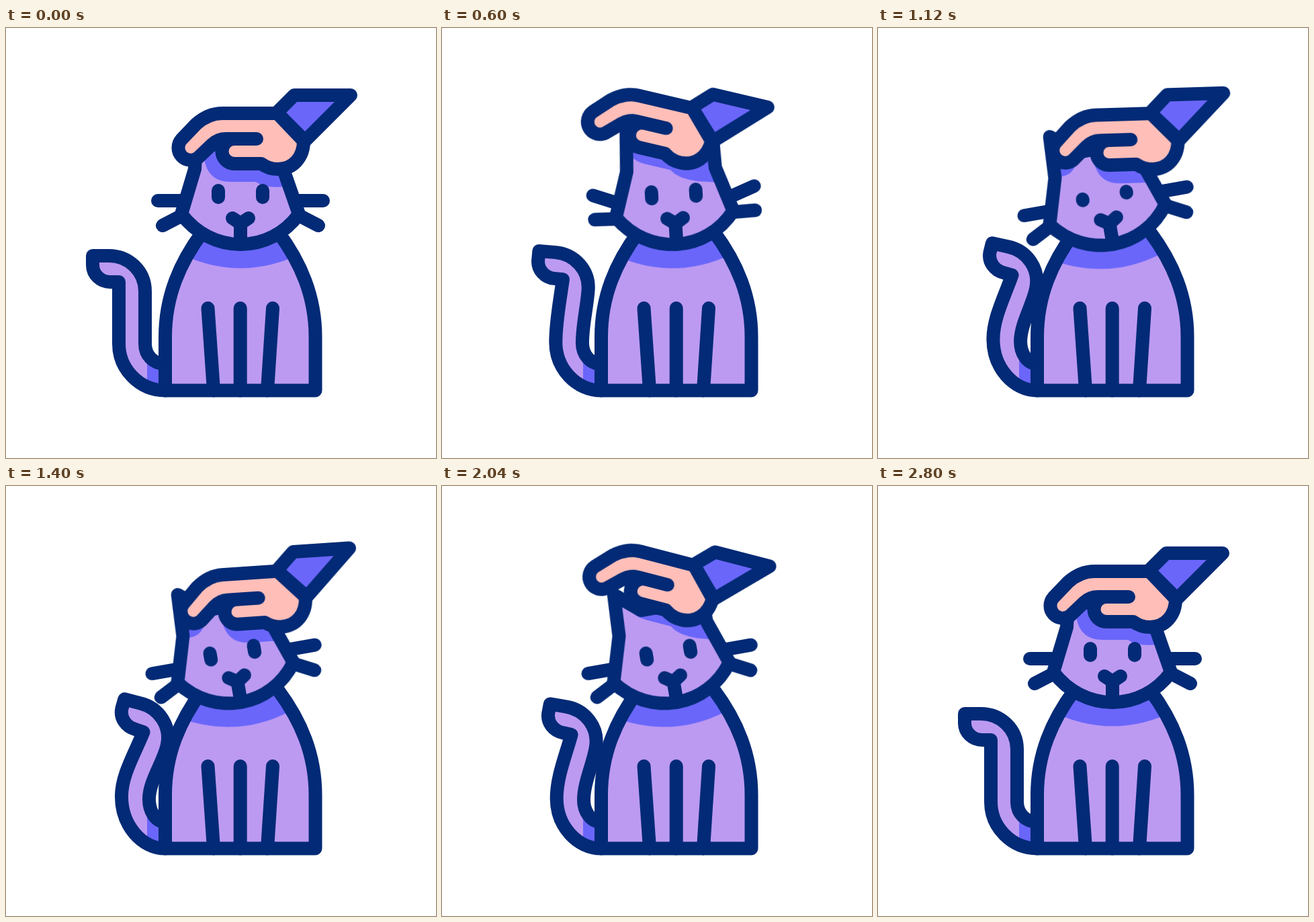
An HTML page without scripts that plays this animation: 640 by 640 pixels, repeating every 3 s.

```html
<!DOCTYPE html>
<html lang="en">
<head>
<meta charset="utf-8">
<title>Petting a cat</title>
<style>
  html, body { margin: 0; width: 100%; height: 100%; overflow: hidden; background: #fff; }
  svg { display: block; width: 100vw; height: 100vh; }

  .lilac { fill: #bc9af2; }
  .shade { fill: #6a66fa; }
  .skin { fill: #ffbeb8; }
  .line { stroke: #032a76; stroke-width: 20; stroke-linecap: round; stroke-linejoin: round; }
  .open { fill: none; }

  .tilt, .tail, .hand, .drift, .eyes, .whisker { animation: 3s infinite ease-in-out; }

  .tilt { --tilt: -10deg; transform-origin: 349px 317px; animation-name: tilt; }
  .neck { --tilt: -7deg; }
  @keyframes tilt {
    0%, 12% { transform: rotate(0deg); }
    32%, 67% { transform: rotate(var(--tilt)); }
    88%, 100% { transform: rotate(0deg); }
  }

  .whisker { animation-name: twitch; }
  @keyframes twitch {
    0%, 12% { transform: rotate(0deg); }
    20.5% { transform: rotate(var(--lift)); }
    32%, 67.5% { transform: rotate(0deg); }
    86% { transform: rotate(var(--lift)); }
    93.3%, 100% { transform: rotate(0deg); }
  }

  .eyes { animation-name: blink; }
  @keyframes blink {
    0%, 34%, 42%, 73%, 82%, 100% { d: path("M316 242V252M382 242V252"); }
    37%, 39%, 76.5%, 78% { d: path("M316 248V250M382 248V250"); }
  }

  .tail { animation-name: sway; }
  @keyframes sway {
    0%, 93.3%, 100% { d: path("M237 539.5C199 539.5 168 508 168 470C168 440 168 409 168 378L155 378C141 378 129 367 129 353L129 339L153 339C183 339 207 362 207 392C207 418 207 444 207 470C207 487 219 500 237 500"); }
    51% { d: path("M237 539.5C202 539.5 172 505 172 462C172 430 192 398 205 366L193 362C179 358 170 345 173 331L177 317L200 323C229 330 247 358 240 387C234 412 213 440 213 466C213 483 222 500 237 500"); }
  }

  .hand { transform-origin: 393px 139.5px; animation-name: stroke; }
  @keyframes stroke {
    0% { transform: translate(0, 0) rotate(0deg); }
    20% { transform: translate(-34px, -10.5px) rotate(13.2deg); animation-timing-function: cubic-bezier(.42, 0, .75, .85); }
    37.33% { transform: translate(2.5px, .5px) rotate(-1.7deg); animation-timing-function: ease-out; }
    42.67% { transform: translate(4.5px, .5px) rotate(-5deg); animation-timing-function: ease-in; }
    56% { transform: translate(-22.5px, -.5px) rotate(4deg); animation-timing-function: ease-out; }
    68% { transform: translate(-31.5px, -12px) rotate(14.6deg); animation-timing-function: linear; }
    77.33% { transform: translate(-14.5px, -5px) rotate(5.2deg); animation-timing-function: ease-out; }
    93.33%, 100% { transform: translate(0, 0) rotate(0deg); }
  }

  /* the hand's shadow slides less than the hand */
  .drift { animation-name: drift; }
  @keyframes drift {
    0%, 93.3%, 100% { transform: translateX(0); }
    20%, 68% { transform: translateX(22px); }
  }
</style>
</head>
<body>
<svg viewBox="0 0 640 640">
  <defs>
    <path id="body" d="M293 303C258 350 237 400 237 460V539.5H460.5V460C460.5 400 439.5 350 404.5 303"/>
    <path id="head" d="M284 148L281 210L261 277C283 306 315 322 349 322C383 322 415 306 436 277L413 211L411 148L378 178H320Z"/>
    <clipPath id="bodyClip"><use href="#body"/></clipPath>
    <clipPath id="headClip"><use href="#head" class="tilt"/></clipPath>
  </defs>

  <path class="tail lilac" d=""/>
  <path class="shade" d="M210 492H237V534H210Z"/>
  <path class="tail line open" d=""/>

  <use href="#body" class="lilac"/>
  <g clip-path="url(#bodyClip)">
    <path class="tilt neck shade" d="M255 290V334Q349 381 443 334V290Z"/>
  </g>
  <use href="#body" class="line open"/>
  <path class="line open" d="M300.5 417L309 539.5M348.7 417V539.5M397 417L389 539.5"/>

  <g class="tilt line open">
    <path class="whisker" style="--lift:21deg;transform-origin:268px 257px" d="M226 257H268"/>
    <path class="whisker" style="--lift:29deg;transform-origin:262px 279px" d="M233 294L262 279"/>
    <path class="whisker" style="--lift:-21deg;transform-origin:430px 257px" d="M472 257H430"/>
    <path class="whisker" style="--lift:-29deg;transform-origin:436px 279px" d="M465 294L436 279"/>
  </g>

  <use href="#head" class="tilt lilac"/>
  <g clip-path="url(#headClip)" class="shade">
    <g class="drift">
      <path class="hand" d="M294 180C294 211 306 229 335 229H372C382 236 396 238 416 236L460 228V180Z"/>
    </g>
    <circle class="hand" cx="266" cy="192" r="25"/>
  </g>
  <g class="tilt line open">
    <use href="#head"/>
    <path class="eyes" d="M316 242V252M382 242V252"/>
    <path d="M337 283L349 291L361 283M349 291V320"/>
  </g>

  <g class="hand line">
    <path class="shade" d="M513 100H429L403 126L445 168Z"/>
    <path class="skin" d="M404 127H322C304 127 292 135 283 143L261 166A18.5 18.5 0 0 0 286 193L307 173C314 167 319 165 328 165H373H340A18.5 18.5 0 0 0 340 202H380C388 208 396 210 405 210C427 210 443 193 443 168Z"/>
  </g>
</svg>
</body>
</html>
```
